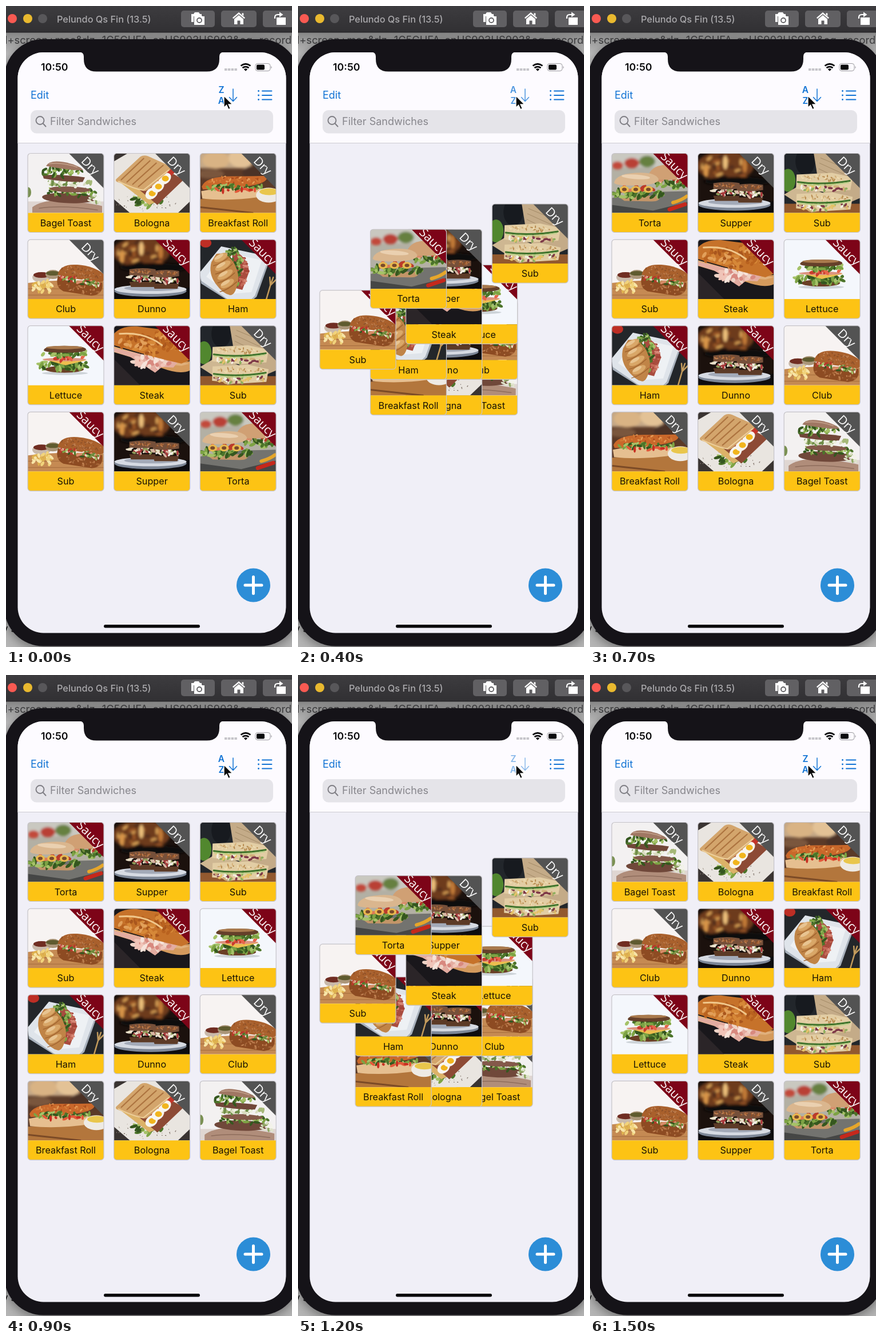
These frames come from a looping animation (500x1120 px, 1600 ms). An HTML page:

```html
<!DOCTYPE html>
<html lang="en">
<head>
<meta charset="utf-8">
<title>Sandwich sorter</title>
<style>
  html, body { margin: 0; width: 100%; height: 100%; overflow: hidden; background: #999; }
  svg { display: block; width: 500px; height: 1120px; }
  text { font-family: Inter, Roboto, sans-serif; white-space: pre; }
  .name { font-size: 16.2px; text-anchor: middle; fill: #171204; }
  .tag { font: 21px "Open Sans", "Noto Sans", sans-serif; text-anchor: middle; fill: #fff; }
  .blue { fill: #1173d4; }
  .line { fill: none; stroke: #1173d4; stroke-linecap: round; stroke-linejoin: round; }
  #sort text { font-size: 15.5px; font-weight: 600; text-anchor: middle; }
</style>
</head>
<body>
<svg viewBox="0 0 500 1120">
  <defs>
    <linearGradient id="bar" x2="0" y2="1">
      <stop stop-color="#3d3c3f"/><stop offset="1" stop-color="#313033"/>
    </linearGradient>
    <linearGradient id="desk" x2="0" y2="1">
      <stop stop-color="#858585"/><stop offset=".018" stop-color="#a2a2a2"/>
      <stop offset=".035" stop-color="#bcbcbc"/><stop offset="1" stop-color="#b4b4b4"/>
    </linearGradient>
    <clipPath id="round"><rect width="133" height="138" rx="5"/></clipPath>
    <clipPath id="photo"><path d="M0 0h133v104H0z"/></clipPath>
    <filter id="soft"><feGaussianBlur stdDeviation="2"/></filter>
    <filter id="shade"><feGaussianBlur stdDeviation="9"/></filter>
  </defs>

  <!-- window behind the device -->
  <rect y="46" width="500" height="1074" fill="url(#desk)"/>
  <text x="-2" y="65.500" font-size="18.3" fill="#3c3c3e">l+screen+mac&amp;rlz=1C5CHFA_enUS903US903&amp;oq=record</text>
  <text x="-6" y="1094" font-size="17" fill="#111">y s</text>
  <rect x="-3" y="62" width="516" height="1061" rx="68" opacity=".4" filter="url(#shade)"/>
  <rect width="500" height="46" fill="url(#bar)"/>
  <path d="M0 46h500" stroke="#1d1c1e"/>
  <circle cx="11" cy="22" r="8" fill="#f95a52"/>
  <circle cx="38" cy="22" r="8" fill="#e9b92f"/>
  <circle cx="64" cy="22" r="8" fill="#58575a"/>
  <text x="89" y="28.500" font-size="16.3" font-weight="500" fill="#aaa9ac">Pelundo Qs Fin (13.5)</text>
  <g fill="#616063">
    <rect x="306" y="8" width="59" height="29" rx="5"/>
    <rect x="376" y="8" width="62" height="29" rx="5"/>
    <rect x="449" y="8" width="60" height="29" rx="5"/>
  </g>
  <g fill="#fff">
    <path d="M324 14h4l2-3h7l2 3h3v4h-14v10h-4z"/>
    <path d="M329 18h4l2-3h6l2 3h4v15h-18z"/>
    <circle cx="338" cy="25" r="4" fill="none" stroke="#616063" stroke-width="1.8"/>
    <path d="M407 11l11 9.500-1.500 1.800L407 14.300l-9.500 8L396 20.500zM399 22.700l8-6.700 8 6.700v9.300h-5.500v-6.500h-5V32H399zM412.500 12.500h2.800v5l-2.800-2.400z"/>
    <path d="M473 20h16v13h-16z"/>
    <path d="M470 22v-2q0-5 5-5h4" fill="none" stroke="#fff" stroke-width="2.200"/>
    <path d="M478 10.500l6.500 4.500-6.500 4.500z"/>
  </g>

  <!-- device -->
  <rect x="-3" y="58" width="516" height="1060.500" rx="68" fill="#151318"/>
  <rect x="20.500" y="81" width="469" height="1014.500" rx="45" fill="#f0eff7"/>
  <path d="M20.500 240V126a45 45 0 0 1 45-45H444.500a45 45 0 0 1 45 45V240z" fill="#fdfbff"/>
  <path d="M20.500 239.500H489.500" stroke="#cccbd1"/>
  <path d="M128 80.500q8 0 8 8v4q0 22 22 22h193q22 0 22-22v-4q0-8 8-8z" fill="#151318"/>

  <!-- status and navigation -->
  <text x="61" y="113" font-size="17.8" font-weight="600" fill="#0a0a0c">10:50</text>
  <path d="M382 111h22" stroke="#c6c5ca" stroke-width="4" stroke-dasharray="4.500 1.300"/>
  <path d="M410.500 104.500q8.500-6.500 17 0M413.500 108.200q5.500-4.200 11 0" fill="none" stroke="#0a0a0c" stroke-width="2.800"/>
  <path d="M415.800 110.500q3.200-2.500 6.400 0l-3.200 3.300z" fill="#0a0a0c"/>
  <rect x="436" y="100.500" width="26" height="13" rx="4" fill="none" stroke="#9c9ba0"/>
  <rect x="438" y="102.500" width="14" height="9" rx="2" fill="#0a0a0c"/>
  <path d="M463.500 105q2.500 2 0 4.500z" fill="#9c9ba0"/>
  <text class="blue" x="43" y="162" font-size="18">Edit</text>
  <g id="sort">
    <text class="blue" x="376.500" y="151.500"></text>
    <text class="blue" x="376.500" y="171"></text>
    <path class="line" stroke-width="1.500" d="M397 145v21.500m-6.500-7l6.500 7 6.500-7"/>
  </g>
  <path class="line" stroke-width="1.900" d="M448 148.500h16.500m-16.500 7.500h16.500m-16.500 7.500h16.500"/>
  <path class="line" stroke-width="2.800" d="M441.500 148.500h.1m-.1 7.500h.1m-.1 7.500h.1"/>
  <rect x="43" y="182" width="424" height="40.500" rx="10" fill="#e5e4e9"/>
  <path d="M65 205.500l4.500 5M66.500 200a7 7 0 1 0-14 0a7 7 0 1 0 14 0" fill="none" stroke="#7e7d83" stroke-width="1.900" stroke-linecap="round"/>
  <text x="77" y="208.300" font-size="18" fill="#87868c">Filter Sandwiches</text>

  <g id="cards"></g>

  <circle cx="432.500" cy="1012" r="29.500" fill="#2c8dd7"/>
  <path d="M418 1012h29m-14.500-14.500v29" stroke="#fff" stroke-width="5" stroke-linecap="round"/>
  <rect x="171" y="1081" width="168" height="5.500" rx="2.700" fill="#08080a"/>
  <path d="M381 157v20.500l4.600-4.300 3.300 7.300 3.300-1.500-3.200-7H396z" fill="#0a0a0a" stroke="#fff" stroke-width="1.300"/>
</svg>

<script>
let seed = 7;
const rand = () => (seed = seed * 16807 % 2147483647) / 2147483647;

// Drawing helpers: ellipse, fill, line, scattered bits, blurred group
const e = (c, x, y, rx, ry = rx, a = 0) =>
  `<ellipse fill="${c}" cx="${x}" cy="${y}" rx="${rx}" ry="${ry}" transform="rotate(${a} ${x} ${y})"/>`;
const p = (c, d) => `<path fill="${c}" d="${d}"/>`;
const l = (c, w, d) => `<path fill="none" stroke="${c}" stroke-width="${w}" stroke-linecap="round" d="${d}"/>`;
const bg = c => p(c, 'M0 0h133v104H0z');
const blur = s => `<g filter="url(#soft)">${s}</g>`;
const turn = (a, x, y, s) => `<g transform="rotate(${a} ${x} ${y})">${s}</g>`;
const bits = (n, colors, x, y, rx, ry, size) => Array.from({ length: n }, (_, i) => {
  const a = rand() * 6.283, r = Math.sqrt(rand());
  return e(colors[i % colors.length], (x + rx * r * Math.cos(a)).toFixed(1), (y + ry * r * Math.sin(a)).toFixed(1),
    (size * (.6 + rand())).toFixed(1), (size * .55).toFixed(1), Math.round(rand() * 180));
}).join('');

const leaf = ['#4c742a', '#7da344', '#a5c268', '#35571f'];
const crumb = ['#c08152', '#8d5028', '#a9683a'];
const mixed = ['#b8382b', '#e9d9c4', '#6d8a3a', '#d98d6c'];

const photos = {
  bagel: bg('#f3f1f1') + p('#dfd6d2', 'M0 84H133V104H0z') + e('#7b9154', 1, 68, 5, 9) +
    p('#b08d7a', 'M8 94Q26 80 66 83T130 92V104H8z') + l('#8e6d5c', 1.5, 'M20 96Q60 90 122 99') +
    e('#70483a', 72, 78, 47, 9, 2) + bits(44, leaf, 72, 68, 48, 7, 4) + e('#84594a', 74, 63, 36, 5, 2) +
    bits(40, ['#d9dcc0', '#a5b878', '#6f8d48', '#eef0e0'], 72, 53, 44, 6, 4) + p('#714739', 'M26 38Q60 36 100 42L96 50Q60 50 28 44z') +
    bits(44, leaf, 60, 32, 38, 9, 4) + p('#a07763', 'M32 22Q38 11 62 15T97 29Q80 31 32 22z') + l('#bd9a85', 2, 'M38 18Q60 15 86 24') +
    bits(20, ['#dfe3cb', '#8fa763', '#f3f3ea'], 118, 82, 11, 9, 3),
  panini: bg('#3a3432') + p('#e9e5e0', 'M0 14L24 0H114L133 26V84L112 104H28L0 80z') +
    bits(34, ['#57483e', '#a4998e'], 58, 86, 55, 18, .9) + bits(24, leaf, 60, 82, 28, 10, 5) +
    p('#dcb268', 'M10 50L62 90 76 84 32 48z') + p('#8d4a35', 'M40 60L76 90 122 46 104 36z') +
    p('#c4362a', 'M64 58L100 22 110 30 72 66z') +
    [[66, 70], [77, 58], [89, 44]].map(([x, y]) => e('#f8f5ee', x, y, 12, 9, -40) + e('#f1b51e', x + 1, y, 6, 5)).join('') +
    p('#d3a56c', 'M4 45L46 6Q52 2 60 5L98 22Q102 25 98 29L60 63Q54 68 46 64L6 50Q2 48 4 45z') +
    l('#ad7440', 2.2, 'M13 46L52 9M23 50L63 13M33 54L74 17M43 58L86 21') + l('#edcf9b', 2, 'M8 49Q40 64 52 64L96 29'),
  roll: bg('#5b3a28') + blur(p('#c4a786', 'M-9-9H90V26H-9z') + e('#d9b384', 28, 12, 24, 15) + e('#e3c296', 72, 8, 22, 17) +
    e('#4b3328', 106, 34, 32, 14) + e('#7a573e', 18, 36, 24, 8)) + p('#b3763c', 'M0 80L133 72V104H0z') + l('#7b4a26', 3, 'M0 94L92 104') +
    p('#e6bf90', 'M2 66Q50 56 108 62L106 76Q50 84 4 79z') +
    p('#c9682b', 'M3 58Q10 40 56 40T116 39Q122 50 92 56T5 63z') + bits(30, ['#e59a55', '#ab4d1d', '#d27a35'], 60, 47, 50, 6, 2.5) +
    bits(36, leaf, 58, 59, 54, 4, 4) + bits(10, ['#c92f22', '#e2593a'], 62, 64, 42, 3, 4) +
    e('#eeeae4', 120, 73, 22, 13) + e('#e9c64c', 121, 67, 17, 6),
  club: bg('#f7f3f2') + p('#c58a53', 'M0 76Q60 68 133 73V104H0z') + l('#a46c3c', 1, 'M0 86H133M0 97H133') +
    e('#c9b9aa', 24, 66, 16, 9) + e('#702d22', 24, 62, 14, 5) + e('#ab9679', 44, 61, 13, 8) + e('#5f5b2f', 44, 59, 12, 4) +
    bits(26, ['#f1d37c', '#dfb24f', '#f7e4a6'], 27, 83, 19, 10, 4.5) +
    turn(10, 90, 72, p('#8d4b22', 'M52 70Q90 84 130 68Q137 88 116 94L66 95Q50 90 52 72z') + bits(40, crumb, 92, 86, 36, 6, 2) +
      p('#a9602c', 'M51 68Q52 48 82 45T132 54Q138 64 126 68L72 70z') + bits(60, crumb, 92, 57, 36, 9, 1.8) +
      bits(34, mixed, 90, 72, 39, 4, 3.5) + bits(12, leaf, 90, 74, 38, 4, 3)),
  diner: bg('#1b110d') + blur(e('#6d3a1a', 48, 22, 50, 26) +
    bits(26, ['#9b5725', '#d9a055', '#4b2a1c', '#2a1710'], 55, 20, 52, 26, 4.5) + e('#eec17b', 48, 16, 4, 12) + e('#d9964a', 14, 30, 4, 12) +
    e('#c27a38', 82, 22, 4, 12) + e('#0b0807', 70, 49, 60, 8)) +
    p('#0d0c0f', 'M0 84H133V104H0z') + e('#7d8797', 64, 90, 63, 10) + e('#d6dae2', 64, 87, 63, 8) + e('#a3aab8', 66, 85, 48, 5) +
    [[27, 0], [68, 3]].map(([x, y]) => p('#5c3a26', `M${x} ${y + 74}h46l-3 9h-40z`) +
      bits(34, ['#a7373a', '#eadfc9', '#8d9a58', '#f3efe5', '#d8b7a4'], x + 22, y + 67, 24, 6, 3.5) +
      p('#76503a', `M${x} ${y + 52}q24-4 46 0v9q-22 4-46 1z`) + bits(20, crumb, x + 23, y + 56, 20, 3, 2)).join(''),
  croissant: bg('#23262a') + e('#bd2e25', 10, 6, 10, 8) + p('#a8b1bc', 'M38 14L119 31Q123 33 121 38L99 100 94 104H45L2 77 0 61z') +
    p('#dfe4ea', 'M37 12L117 29Q121 31 119 36L96 98 90 104H48L2 72 0 57z') + p('#eef1f4', 'M42 22L108 36 90 92 52 95 11 65z') +
    p('#a94c3f', 'M56 18Q82 28 86 56L74 88 58 84z') + bits(24, ['#d78776', '#a44236', '#c46a58'], 74, 56, 9, 24, 4) +
    bits(40, leaf, 58, 32, 15, 18, 4) + bits(14, leaf, 66, 62, 5, 20, 4) +
    turn(-14, 45, 62, p('#c08447', 'M38 22Q58 24 64 46T60 84Q52 100 44 98 32 92 24 72T26 34z') +
      [30, 45, 61, 77].map((y, i) => e('#d9a768', 44, y, 16 - Math.abs(i - 1.5) * 2, 6, -16) +
        e('#e8c491', 41, y - 2, 9, 3, -16) + l('#9b602c', 1.2, `M28 ${y + 11}q16 0 33-10`)).join('')) +
    l('#c39b5c', 2.500, 'M128 66L123 80 116 104M122 66L123 80M133 70L123 80'),
  lettuce: bg('#f4f7fc') + e('#cdd3d8', 65, 83, 40, 3) + e('#6a3f25', 64, 76, 34, 6) +
    bits(54, leaf, 63, 69, 46, 8, 5) + p('#edbe4f', 'M26 58L104 60 66 69z') + e('#dc9480', 64, 59, 38, 3) +
    bits(12, ['#c93c2d', '#e8644a'], 64, 55, 34, 3, 5) + bits(34, leaf, 63, 49, 40, 4, 5) +
    p('#65402a', 'M28 43Q28 35 64 35T102 41Q102 47 66 47T28 43z') + e('#a97a4d', 64, 38, 32, 3),
  baguette: bg('#19171b') + p('#d49a5d', 'M52 66L133 62V78Q116 86 84 74z') + p('#2b2528', 'M0 58L46 104H0z') +
    p('#e0b07c', 'M0 36L70 56 133 66 118 70 60 64 0 46z') + p('#e3aca0', 'M0 39L50 50 112 63 104 73 84 72 72 82 54 70 28 54 0 45z') +
    bits(34, ['#f6e3da', '#d8897f', '#f0c4b8', '#eed3c6'], 66, 62, 34, 9, 6) +
    p('#c6722a', 'M0 14Q12 0 40 1L96 8Q130 26 133 60L118 66Q90 60 62 52L0 34z') +
    bits(80, ['#e2a05a', '#a9561d', '#d68838', '#b9621f'], 66, 30, 56, 19, 5) + l('#f0c68a', 3, 'M10 14Q54 10 84 34'),
  wrap: bg('#22262b') + e('#51872e', 7, 47, 13, 20) + e('#171a1f', 37, 14, 17, 24) + p('#c4ab88', 'M52 0H133V78L98 93 62 62z') +
    l('#a38a66', 1, 'M64 8L112 28M62 17L104 36M61 27L96 44') + p('#92592f', 'M0 88H133V104H0z') + p('#ceb792', 'M0 72L32 53 118 92 48 103z') +
    [44, 78].map(y => p('#e2cda4', `M22 ${y - 7}L84 ${y - 10} 120 ${y - 2} 116 ${y + 20} 68 ${y + 23} 21 ${y + 18}z`) +
      bits(44, ['#f4eee0', '#8fae5e', '#7e3948', '#e6c269', '#cfae78'], 69, y + 15, 46, 7, 3.5) +
      l('#3f742c', 3, `M24 ${y + 6}Q66 ${y + 12} 115 ${y + 4}`) + l('#bcd08a', 2, `M25 ${y + 9}Q66 ${y + 15} 113 ${y + 7}`) +
      bits(34, ['#b88c51', '#f0dcae', '#d3b078'], 70, y - 1, 44, 5, 2)).join(''),
  torta: bg('#b3b0a4') + blur(p('#c9c8c0', 'M-9-9H140V24H-9z') + e('#b93f34', 35, 17, 13, 9) + e('#c2483a', 10, 21, 10, 7) + e('#66803f', 62, 14, 14, 10)) +
    p('#73736f', 'M0 78L50 68 133 66V91L70 104H0z') + p('#454645', 'M0 90L72 100 133 85V104H0z') +
    bits(34, leaf, 106, 53, 28, 7, 5) + bits(12, mixed, 100, 48, 26, 3, 4) + p('#d0a074', 'M64 38Q72 18 104 20L126 28Q130 40 118 46L70 46z') +
    p('#c39568', 'M10 74H84Q86 84 70 84L22 83z') + bits(50, leaf, 46, 71, 44, 8, 5) + bits(12, ['#bb3b2b', '#dc7957'], 43, 61, 34, 4, 5) +
    [22, 42, 64].map(x => e('#e9b94e', x, 63, 8, 6) + e('#7a4a2b', x, 63, 4, 3)).join('') +
    p('#dab68e', 'M4 51Q8 36 42 34T82 45Q82 55 44 56T4 51z') + e('#ead0b0', 42, 41, 25, 4, 4) +
    l('#c5281c', 7, 'M101 98L128 89') + l('#e6a62a', 6, 'M107 86Q122 82 131 75')
};

const menu = [
  ['Bagel Toast', 'bagel', 0], ['Bologna', 'panini', 0], ['Breakfast Roll', 'roll', 0],
  ['Club', 'club', 0], ['Dunno', 'diner', 1], ['Ham', 'croissant', 1],
  ['Lettuce', 'lettuce', 1], ['Steak', 'baguette', 1], ['Sub', 'wrap', 0],
  ['Sub', 'club', 1], ['Supper', 'diner', 0], ['Torta', 'torta', 1]
];
const cards = document.getElementById('cards');
cards.innerHTML = menu.map(([name, photo, saucy]) => `<g><g clip-path="url(#round)">
  <g clip-path="url(#photo)">${photos[photo]}
    <path fill="${saucy ? '#7d0418' : '#535353'}" d="M72 0h61v61z"/>
    <text class="tag" transform="translate(109 22) rotate(45)" y="6.500">${saucy ? 'Saucy' : 'Dry'}</text></g>
  <path fill="#fdc314" d="M0 104h133v34H0z"/><text class="name" x="66.500" y="127.200">${name}</text></g>
  <rect width="133" height="138" rx="5" fill="none" stroke="#c5c3c8" stroke-width="1.200"/></g>`).join('');

const items = [...cards.children];
const reversed = menu.slice().sort((a, b) => b[0].localeCompare(a[0]));
const goal = menu.map(m => reversed.indexOf(m));
const slot = i => [38 + 150.6 * (i % 3), 257.5 + 150.6 * Math.floor(i / 3)];

// cubic-bezier(.42, 0, .58, 1)
function ease(x) {
  if (x <= 0) return 0;
  if (x >= 1) return 1;
  let lo = 0, hi = 1, s;
  for (let i = 0; i < 24; i++) {
    s = (lo + hi) / 2;
    const v = 3 * s * (1 - s) * (.42 * (1 - s) + .58 * s) + s ** 3;
    if (v < x) lo = s; else hi = s;
  }
  return s * s * (3 - 2 * s);
}

const sort = document.getElementById('sort');
const [upper, lower] = sort.querySelectorAll('text');

function draw(t) {
  const k = ease((t - 179) / 354) - ease((t - 1100) / 318);
  items.forEach((g, i) => {
    const [x, y] = slot(i), [u, v] = slot(goal[i]);
    g.setAttribute('transform', `translate(${x + (u - x) * k} ${y + (v - y) * k})`);
  });
  const swapped = t >= 200 && t < 1100;
  upper.textContent = swapped ? 'A' : 'Z';
  lower.textContent = swapped ? 'Z' : 'A';
  const age = t - (t < 1000 ? 200 : 1100);   // time since the tap was released
  sort.setAttribute('opacity', age < -100 ? 1 : age < 0 ? .2 : Math.min(1, .23 + age * .0026));
}

const start = performance.now();
function tick() {
  draw(Math.floor((performance.now() - start) % 1600 / 100) * 100);
  requestAnimationFrame(tick);
}
tick();
</script>
</body>
</html>
```
